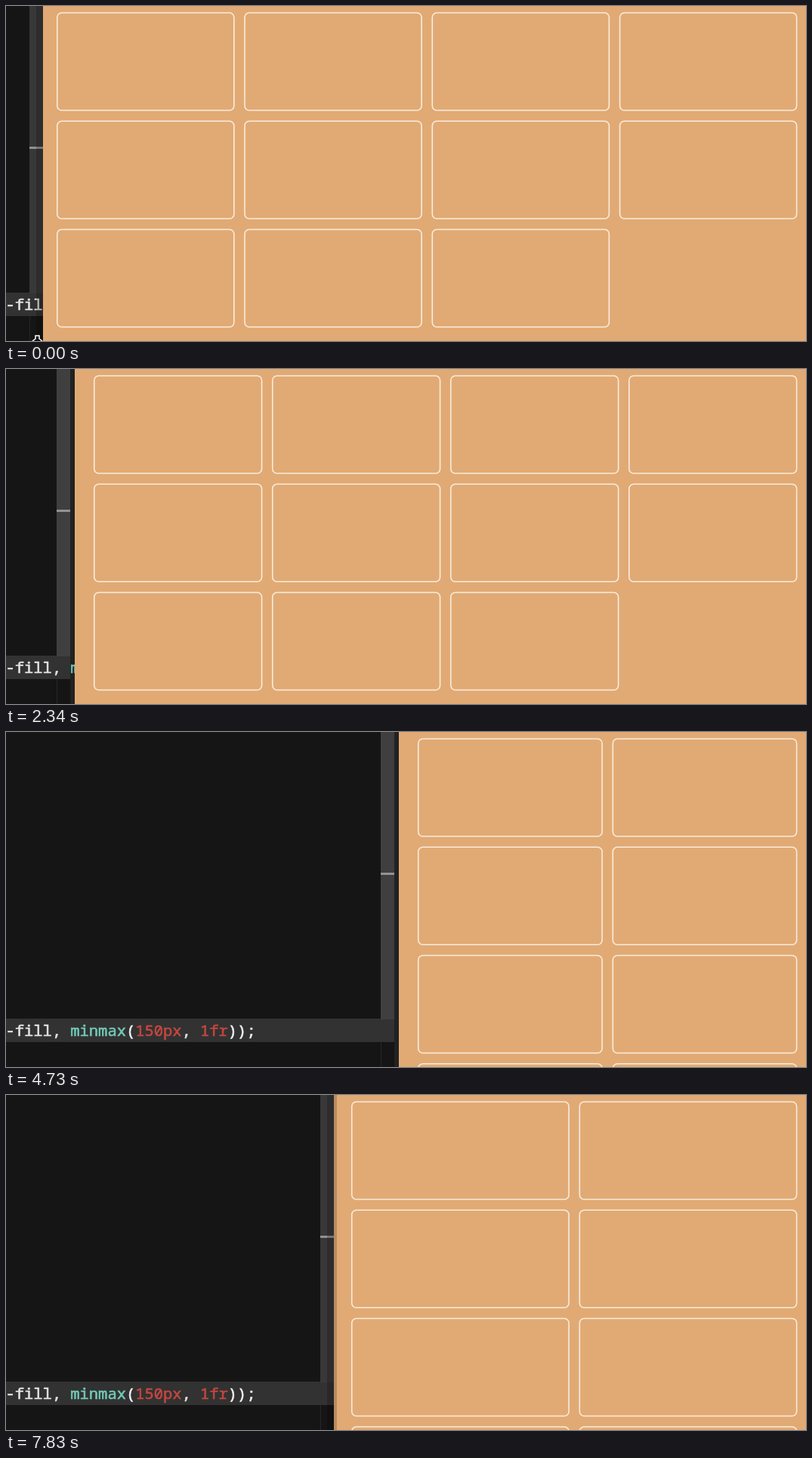
Write an HTML page with a canvas that moves like this. It is 1059x443 px and loops after 7.93 s.

```html
<!DOCTYPE html>
<html lang="en">
<head>
<meta charset="utf-8">
<title>Resizing a grid</title>
<style>
  html, body { margin: 0; width: 100%; height: 100%; overflow: hidden; background: #e1aa74; }
  canvas { display: block; }
</style>
</head>
<body>
<canvas id="stage" width="1059" height="443"></canvas>
<script>
const ctx = document.getElementById('stage').getContext('2d');
const W = 1059, H = 443, LOOP = 7930, TICK = 147.5;
const CELLS = 11, MIN_WIDTH = 194, GAP = 12.7, ROW = 143.25;

// Each drag: first tick, last tick, scrollbar x where it ends
const drags = [
  [0, 1, 31], [1, 3, 22], [9, 12, -21], [13, 17, 154], [18, 20, 307], [22, 25, 407],
  [26, 30, 480], [31, 34, 555], [36, 38, 604], [46, 49, 526], [50, 53, 416]
];

const code = [['-fill, ', '#e4e4e4'], ['minmax', '#72cbb8'], ['(', '#f0f0f0'],
  ['150px', '#c4473f'], [', ', '#e4e4e4'], ['1fr', '#c4473f'], ['));', '#f0f0f0']];

const clamp = u => Math.min(1, Math.max(0, u));
const ease = u => u * u * u * (u * (6 * u - 15) + 10);

// Every drag adds its eased share; the loop starts where the last one ended
function barAt(tick) {
  let from = drags.at(-1)[2], x = from;
  for (const [start, end, to] of drags) {
    x += (to - from) * ease(clamp((tick - start) / (end - start)));
    from = to;
  }
  return x;
}

function rect(color, x, y, w, h) {
  ctx.fillStyle = color;
  ctx.fillRect(x, y, w, h);
}

function drawEditor(bar, pane, covered) {
  rect('#151515', 0, 0, pane, H);
  rect('#323232', 0, 379, bar + 18, 31);
  rect(covered ? '#383838' : '#3f3f3f', bar, 0, 18, 380);
  rect('#929292', bar, 186, 18, 3);
  rect('#262626', bar, 410, 1, H - 410);
  rect('#212222', bar + 18, 0, pane - bar - 18, H);

  ctx.font = '20.45px "Noto Sans Mono", "DejaVu Sans Mono", monospace';
  ctx.lineWidth = .6;
  let x = -.5;
  for (const [text, color] of code) {
    ctx.fillStyle = ctx.strokeStyle = color;
    ctx.fillText(text, x, 402);
    ctx.strokeText(text, x, 402);
    x += ctx.measureText(text).width;
  }
  if (covered) rect('rgba(0,0,0,.2)', bar + 9, 0, 9, H);
}

function drawGrid(left) {
  const width = 1060.1 - left;
  const columns = Math.floor(width / (MIN_WIDTH + GAP));
  const pitch = width / columns;
  ctx.strokeStyle = '#f9ecdd';
  ctx.lineWidth = 1.6;
  ctx.beginPath();
  for (let i = 0; i < CELLS; i++) {
    const x = left + (i % columns) * pitch;
    const y = 8.2 + Math.floor(i / columns) * ROW;
    ctx.roundRect(x + .75, y + .75, pitch - GAP - 1.5, ROW - GAP - 1.5, 6);
  }
  ctx.stroke();
}

function drawCursor() {
  ctx.fillStyle = '#111';
  ctx.strokeStyle = '#fff';
  ctx.lineWidth = 1.5;
  ctx.stroke(new Path2D('M34 444 39 440V436H44V440L49 444'));
}

function draw(now) {
  const tick = Math.max(1, Math.floor((now % LOOP + 12) / TICK));
  const bar = Math.round(barAt(tick));
  const step = barAt(tick) - barAt(tick - 1);
  const covered = step < 0;
  const moving = drags.some(([start, end]) => tick > start && tick < end);
  const settled = !moving && Math.abs(step) < 30;

  // Dragging left, the pane slides over the editor and its grid trails behind
  const pane = bar + (covered ? 18 : 24);
  const grid = Math.round(pane + 25 - Math.min(7, Math.max(0, -step / 10)));

  rect('#e1aa74', 0, 0, W, H);
  if (pane > 0) {
    drawEditor(bar, pane, covered);
    if (tick === 1) drawCursor();
    rect('#e1aa74', pane, 0, W - pane, H);
    if (settled) rect('#b98b5f', pane, 0, covered ? 4 : 6, H);
  }
  drawGrid(grid);
}

const begin = performance.now();
function frame() {
  draw(performance.now() - begin);
  requestAnimationFrame(frame);
}
frame();
</script>
</body>
</html>
```
